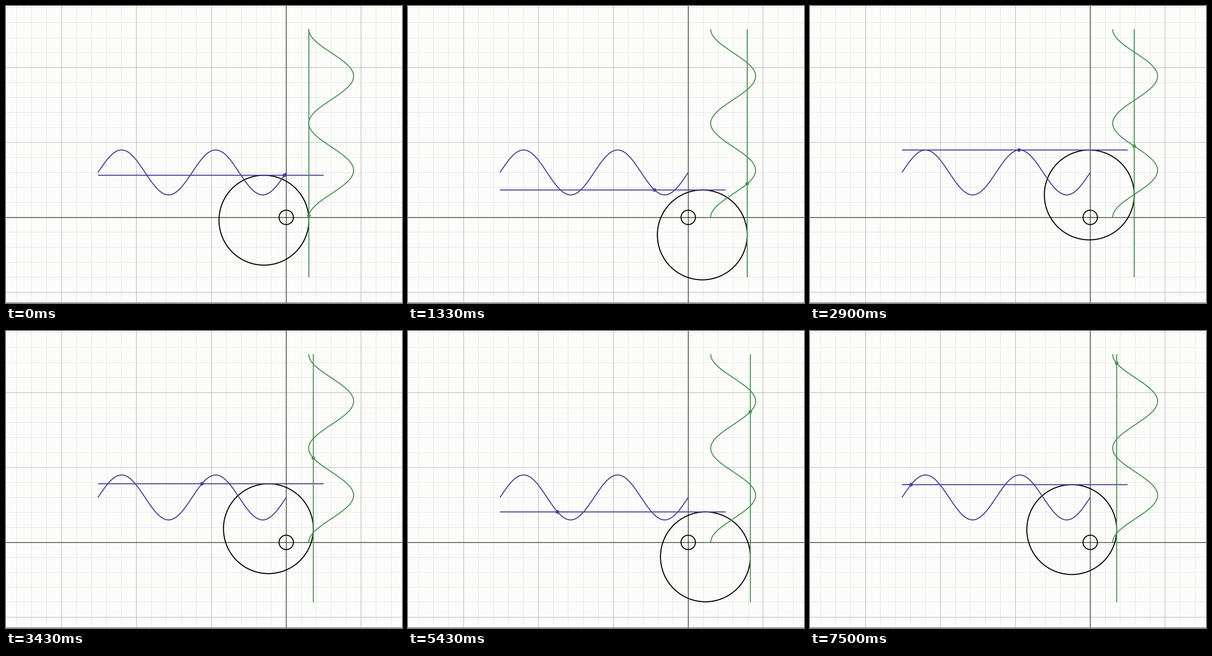
A matplotlib script that plays this animation: 864x648 px, repeating every 7.53 s.

```python
import numpy as np
import matplotlib.pyplot as plt
from matplotlib.animation import FuncAnimation
from matplotlib.patches import Circle

W, H = 864, 648
UNIT = 32.68            # pixels per grid unit
OX, OY = 611.4, 461.2   # origin in pixels from the top left
STEP, FRAMES = 30, 251

PURPLE, GREEN, BLACK = "#503d97", "#4f9153", "#050505"
OLIVE, LAVENDER, PALE = "#e6e8d6", "#dfdff0", "#e4e4e2"
END = 4 * np.pi         # length of each wave
ARM = 1.5               # eccentric offset
RADIUS = 3

# cam angle at a few moments (ms), nearly uniform rotation
TIMES = [0, 1320, 2370, 3420, 4530, 5430, 7500]
ANGLES = [0.126, 2.247, 3.93, 5.628, 7.306, 8.725, 11.96]

fig = plt.figure(figsize=(W / 72, H / 72), dpi=72, facecolor="#fcfdfb")
ax = fig.add_axes([0, 0, 1, 1])
ax.axis("off")
left, right = -OX / UNIT, (W - OX) / UNIT
bottom, top = (OY - H) / UNIT, OY / UNIT
ax.set(xlim=(left, right), ylim=(bottom, top))


def line(xs, ys, color, width=2.2, z=3):
    return ax.plot(xs, ys, color=color, lw=width, zorder=z, snap=False,
                   solid_capstyle="butt")[0]


def vline(x, color, width=1, z=0):
    """Full-height line centred on a pixel column."""
    x = (np.floor(OX + x * UNIT) + 0.5 - OX) / UNIT
    line([x, x], [bottom, top], color, width, z)


def hline(y, color, width=1, z=0):
    """Full-width line centred on a pixel row."""
    y = (OY - np.floor(OY - y * UNIT) - 0.5) / UNIT
    line([left, right], [y, y], color, width, z)


def disc(x, y, r, z, **style):
    return ax.add_patch(Circle((x, y), r, zorder=z, **style))


def grid():
    olive_rows = {14, 13, 12, 11, 9, 6, 4, -3}
    major_rows = {10: "#a9aa98", 5: "#b1b0c2", -5: "#b0afc0"}
    for x in range(-18, 8):
        if x % 5:
            vline(x, PALE)
        elif x:
            vline(x, "#a9aaa6", z=1)
    for y in range(-5, 15):
        if y % 5:
            hline(y, OLIVE if y in olive_rows else LAVENDER)
        elif y:
            hline(y, major_rows[y], z=1)
    vline(0, "#1e1e1c", 1.4, 2)
    hline(0, "#1e1e1c", 1.4, 2)
    hline(bottom + 0.5 / UNIT, "#555555", z=2)


grid()
s = np.linspace(0, END, 600)
line(-s, 3 - ARM * np.sin(s), PURPLE, z=5)
line(3 - ARM * np.cos(s), s, GREEN, z=5)
disc(0, 0, 0.48, 4, fill=False, ec=BLACK, lw=2.2)

cam = disc(0, 0, RADIUS, 4, fill=False, ec=BLACK, lw=2.3)
flat = line([-END, 2.5], [0, 0], PURPLE, z=6)
upright = line([0, 0], [-4, END], GREEN, z=6)
flat_dot = disc(0, 0, 3.9 / UNIT, 7, fc=PURPLE, ec="none")
upright_dot = disc(0, 0, 3.9 / UNIT, 7, fc=GREEN, ec="none")


def update(i):
    a = np.interp(i * STEP, TIMES, ANGLES)
    cx, cy = -ARM * np.cos(a), -ARM * np.sin(a)
    x, y = cx + RADIUS, cy + RADIUS
    cam.center = cx, cy
    flat.set_ydata([y, y])
    upright.set_xdata([x, x])
    flat_dot.center = -a, y
    upright_dot.center = x, a
    return cam, flat, upright, flat_dot, upright_dot


anim = FuncAnimation(fig, update, frames=FRAMES, interval=STEP,
                     repeat=True, repeat_delay=0, blit=False)
plt.show()
```
